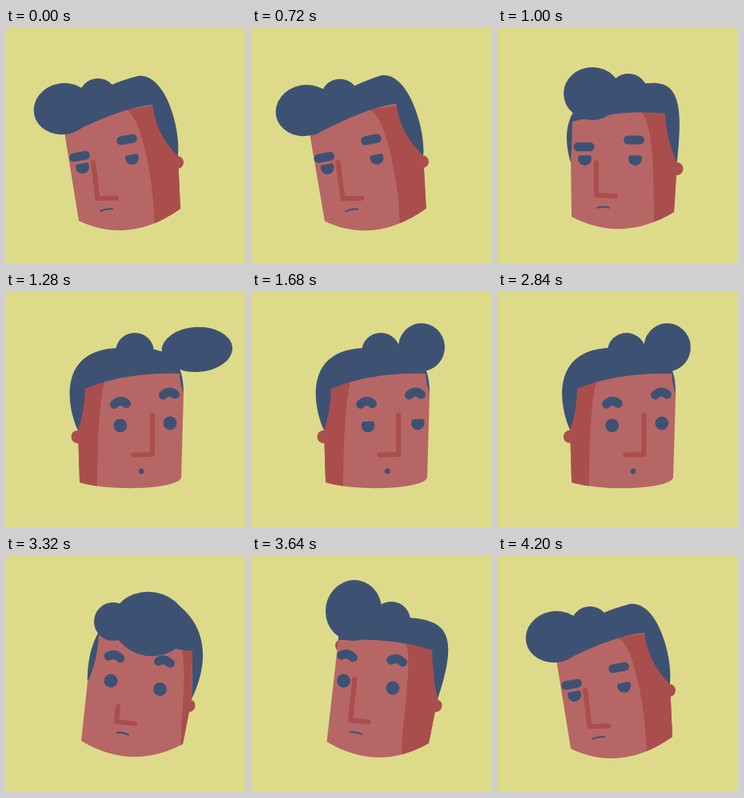
These frames come from a looping animation (300x295 px, 4.24 s). An HTML page:

```html
<!DOCTYPE html>
<html lang="en">
<head>
<meta charset="utf-8">
<title>Turning head</title>
<style>
  html, body { margin: 0; width: 100%; height: 100%; overflow: hidden; background: #dddb8a; }
  svg { display: block; width: 100%; height: 100%; }
  .hair { fill: #3d5273; }
  .skin { fill: #b76666; }
  .shade { fill: #aa4e4d; }
  .line { fill: none; stroke: #3d5273; stroke-linecap: round; stroke-linejoin: round; }
  #nose { stroke: #aa4e4d; stroke-width: 6.2; }
  .brow { stroke-width: 11; }
</style>
</head>
<body>
<svg viewBox="0 0 300 295">
  <clipPath id="faceClip"><path id="clip"/></clipPath>
  <rect width="300" height="295" fill="#dddb8a"/>
  <circle id="ear0" class="shade" r="8"/>
  <circle id="ear1" class="shade" r="8"/>
  <path id="face" class="skin"/>
  <g clip-path="url(#faceClip)" class="shade">
    <path id="shadeRight"/>
    <path id="shadeLeft"/>
  </g>
  <g class="hair">
    <path id="cap"/>
    <circle id="bump" r="24"/>
    <ellipse id="quiff"/>
  </g>
  <path id="nose" class="line"/>
  <path id="mouth" class="line"/>
  <path id="brow0" class="line brow"/>
  <path id="brow1" class="line brow"/>
  <path id="eye0" class="hair"/>
  <path id="eye1" class="hair"/>
</svg>
<script>
const LOOP = 4240, STEP = 40;
const $ = id => document.getElementById(id);
const set = (id, attrs) => {
  for (const name in attrs) $(id).setAttribute(name, attrs[name]);
};

// crown: left tip, two handles, top, two handles, right tip
// hairline: right corner, bend, left corner
// jaw: left, right, depth, skew    quiff: centre, radii
// shade: right foot and top, left top    nose: top, corner, foot length
// mouth: centre, half width, thickness    mood: tilt, brow arch, eyelid
const left = {
  crown: [73,130, 80,100, 115,72, 165,60, 200,56, 219,128, 215,160],
  hairline: [183,96, 148,98, 78,133],
  quiff: [71.5,101, 37,32], bump: [115,87],
  jaw: [91,241, 218,226, 25,.67], shade: [186, 148, 60], ears: [100, 214],
  brows: [92,160.5, 151,139.5], eyes: [95.5,173.5, 157.5,162.5],
  nose: [109,168, 114.5,213, 23.5], mouth: [125.5,227.5, 7.5,2], mood: [-10, 0, -.5]
};
const front = {
  crown: [91,168, 83,140, 70,70, 190,69, 228,66, 231,100, 224,168],
  hairline: [209,107, 160,101, 93,117],
  quiff: [118,82, 36,33], bump: [163,81],
  jaw: [92,236, 220,230, 24,.67], shade: [195, 174, 85], ears: [104, 223.5],
  brows: [107.5,148.5, 170,140], eyes: [108.5,163.5, 171.5,163.5],
  nose: [123,168, 123,209, 23.5], mouth: [131.5,224.7, 7.5,2], mood: [0, 0, -.5]
};
const right = {
  crown: [90,173, 75,140, 66,72, 140,70, 200,66, 222,80, 222,126],
  hairline: [217,102, 150,100, 99,121],
  quiff: [212,69, 29,30], bump: [161,75],
  jaw: [92,238, 219,232, 14,.97], shade: [224, 215, 123], ears: [89.5, 205],
  brows: [143,140, 204,128.5], eyes: [142.8,167, 205,164],
  nose: [183,153.5, 183,203, -23.5], mouth: [169.2,224.5, .4,6], mood: [-3, 7, -1]
};
const tilted = {
  crown: [102,157, 102,125, 108,60, 195,50, 235,66, 265,110, 232,179],
  hairline: [233,119, 165,110, 116,99],
  quiff: [180,85, 47,40], bump: [134,82],
  jaw: [94,231, 221,235, 24,.67], shade: [218, 210, 100], ears: [112, 228.5],
  brows: [135.5,126.5, 198,133], eyes: [131,156, 192.5,166.5],
  nose: [140,188, 138,207, 23], mouth: [146,222, 7,2.2], mood: [10, 6, -1]
};
const leaning = {
  crown: [108,104, 105,95, 140,78, 195,77, 246,80, 258,100, 232,179],
  hairline: [225,118, 180,102, 108,105],
  quiff: [127,68, 35,38], bump: [174,81],
  jaw: [93.5,232, 221,234, 25,.67], shade: [187, 185, 95], ears: [112, 229.5],
  brows: [119,125.5, 181,131.5], eyes: [114.5,156, 176,165],
  nose: [128.5,153.5, 123,205, 22.5], mouth: [130,221.5, 7.5,2], mood: [10, 6, -1]
};

const lerp = (a, b, p) => a + (b - a) * p;
const mix = (a, b, p) => Object.fromEntries(Object.keys(a).map(
  key => [key, a[key].map((v, i) => lerp(v, b[key][i], p))]));

const windUp = mix(left, front, -.2);
const swung = { ...right, quiff: [240, 72, 45, 28] };
const awake = { ...left, brows: left.brows.map((v, i) => i % 2 ? v - 6 : v), mood: [-10, 6, -1] };

const linear = p => p;
const smooth = p => p * p * (3 - 2 * p);
const easeIn = p => p ** 1.7;
const easeOut = p => 1 - (1 - p) ** 2;

// time, pose, easing towards it
const keys = [
  [0, left, linear], [440, left, linear], [640, windUp, smooth], [1000, front, easeIn],
  [1240, swung, easeOut], [1560, right, smooth], [2800, right, linear],
  [3320, tilted, easeIn], [3640, leaning, linear], [3920, awake, easeOut],
  [4200, left, smooth], [LOOP, left, linear]
];
const blinks = [1600, 2200], BLINK = 280;

function poseAt(t) {
  const i = keys.findIndex(key => key[0] > t);
  const [t0, from] = keys[i - 1], [t1, to, ease] = keys[i];
  const pose = mix(from, to, ease((t - t0) / (t1 - t0)));
  for (const start of blinks) {
    const p = (t - start) / BLINK;
    if (p <= 0 || p >= 1) continue;
    const shut = Math.sin(Math.PI * p) ** 5;
    pose.mood[2] += 1.3 * shut;
    pose.eyes = pose.eyes.map((v, k) => k % 2 ? v : v + 2.3 * Math.min(1, shut * 4));
  }
  return pose;
}

// Inner edge of a sideburn, bowed towards the face.
const bow = (tip, corner) => [lerp(corner[0], tip[0], .15), lerp(corner[1], tip[1], .6)];

function jawCurve([x0, y0, x1, y1, depth, skew]) {
  const at = p => [lerp(x0, x1, p), lerp(y0, y1, p) + depth];
  return `L${x0} ${y0}C${at(.33)} ${at(skew)} ${x1} ${y1}`;
}

function brow(x, y, tilt, arch) {
  const a = tilt * Math.PI / 180, dx = 7.5 * Math.cos(a), dy = 7.5 * Math.sin(a);
  return `M${x - dx} ${y - dy}Q${x} ${y - arch} ${x + dx} ${y + dy}`;
}

// A disc cut off above the eyelid.
function eye(x, y, tilt, lid) {
  const r = 8.4, h = Math.max(-.995, lid), a = tilt * Math.PI / 180;
  const cx = r * Math.sqrt(1 - h * h), cy = r * h;
  const at = u => [x + u * Math.cos(a) - cy * Math.sin(a), y + u * Math.sin(a) + cy * Math.cos(a)];
  return `M${at(-cx)}A${r} ${r} 0 ${h < 0 ? 1 : 0} 0 ${at(cx)}Z`;
}

function draw(t) {
  const p = poseAt(t);
  const [tilt, arch, lid] = p.mood;
  const tips = [p.crown.slice(0, 2), p.crown.slice(12)];
  const cornerR = p.hairline.slice(0, 2), bend = p.hairline.slice(2, 4), cornerL = p.hairline.slice(4);

  const outline = `M${tips[0]}${jawCurve(p.jaw)}L${tips[1]}L${cornerR}` +
    `Q${bend[0]} ${bend[1] - 8} ${cornerL}Z`;
  set('face', { d: outline });
  set('clip', { d: outline });
  const [foot, top, side] = p.shade;
  set('shadeRight', { d: `M${foot} 250C${foot} 200 ${top + 22} 105 ${top} 102L300 80V270H${foot}Z` });
  set('shadeLeft', { d: `M0 90H${side}V112Q${side - 9} 150 ${side - 9} 245V270H0Z` });

  set('cap', { d: `M${tips[0]}C${p.crown.slice(2)}Q${bow(tips[1], cornerR)} ${cornerR}` +
    `Q${bend} ${cornerL}Q${bow(tips[0], cornerL)} ${tips[0]}Z` });
  const [qx, qy, rx, ry] = p.quiff;
  set('quiff', { cx: qx, cy: qy, rx, ry, transform: `rotate(${tilt} ${qx} ${qy})` });
  set('bump', { cx: p.bump[0], cy: p.bump[1] });

  const [nx, ny, kx, ky, toe] = p.nose;
  set('nose', { d: `M${nx} ${ny}L${kx} ${ky}l${toe} ${1 + tilt * .15}` });
  const [mx, my, w, thick] = p.mouth, slope = w * tilt * .017;
  set('mouth', { d: `M${mx - w} ${my - slope}Q${mx} ${my - 2.2} ${mx + w} ${my + slope}`, 'stroke-width': thick });

  for (const i of [0, 1]) {
    const pair = list => list.slice(i * 2, i * 2 + 2);
    set('brow' + i, { d: brow(...pair(p.brows), tilt, arch) });
    set('eye' + i, { d: eye(...pair(p.eyes), tilt, lid) });
    set('ear' + i, { cx: p.ears[i], cy: tips[i][1] + 8 });
  }
}

const begin = performance.now();
function tick() {
  const t = (performance.now() - begin) % LOOP;
  draw(Math.floor(t / STEP) * STEP);
  requestAnimationFrame(tick);
}
tick();
</script>
</body>
</html>
```
